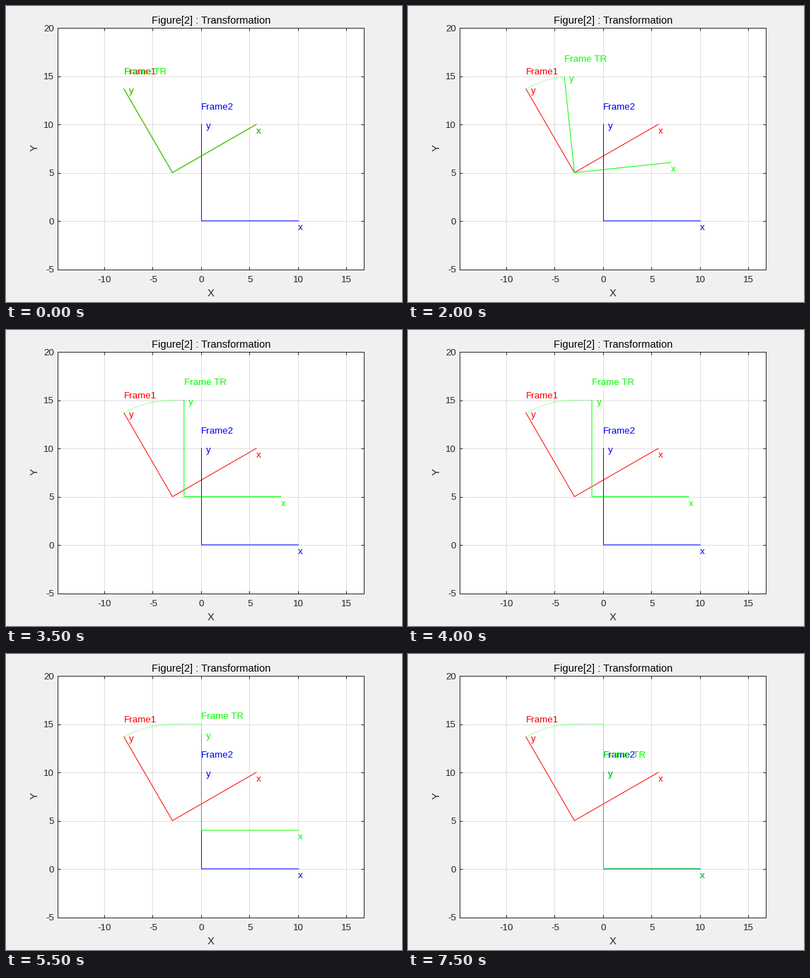
A matplotlib script for the animation above (8.5 s loop, 560 by 420 pixels).

```python
import numpy as np
import matplotlib.pyplot as plt
from matplotlib.animation import FuncAnimation
from matplotlib.transforms import ScaledTranslation

W, H, DPI = 560, 420, 100
PX = 72 / DPI                      # one pixel in points
plt.rcParams["font.family"] = "Liberation Sans"

UNIT = 13.692                      # pixels per data unit
LEFT, RIGHT, TOP, BOTTOM = 72.8, 506.4, 31.25, 373.55
X0 = 275.95                        # pixel column of x = 0
SMALL, LARGE = 40 / 3 * PX, 44 / 3 * PX
DARK = "#262626"
XTICKS = [-10, -5, 0, 5, 10, 15]
YTICKS = [-5, 0, 5, 10, 15, 20]

fig = plt.figure(figsize=(W / DPI, H / DPI), dpi=DPI, facecolor="#f0f0f0")
ax = fig.add_axes([LEFT / W, 1 - BOTTOM / H, (RIGHT - LEFT) / W, (BOTTOM - TOP) / H])
ax.set(xlim=((LEFT - X0) / UNIT, (RIGHT - X0) / UNIT), ylim=(-5, 20),
       xticks=XTICKS, yticks=YTICKS)
ax.set_axisbelow(True)
ax.grid(color="#dfdfdf", lw=PX)
ax.tick_params(direction="in", length=4.3 * PX, width=PX, color=DARK,
               top=True, right=True, labelbottom=False, labelleft=False)
for spine in ax.spines.values():
    spine.set(linewidth=PX, color=DARK)


def put(x, y, text, size=SMALL, color=DARK, ha="center", **kw):
    fig.text(x / W, 1 - y / H, text, size=size, color=color, ha=ha,
             **{"va": "baseline", **kw})


def shifted(dx, dy):
    """Data coordinates moved by a few pixels."""
    return ax.transData + ScaledTranslation(dx / DPI, dy / DPI, fig.dpi_scale_trans)


for v in XTICKS:
    put(X0 + 0.5 + v * UNIT, 392.5, str(v))
for v in YTICKS:
    put(68, BOTTOM - (v + 5) * UNIT + 4.7, str(v), ha="right")
put(290, 25, "Figure[2] : Transformation", LARGE, "black")
put(290, 412, "X", LARGE)
put(41, 201.5, "Y", LARGE, rotation=90, va="center")

line_tf = shifted(0.5, 0.2)
text_tf = shifted(0.3, -6.15)


class Axes2D:
    """A labelled pair of axes, ten units long."""

    def __init__(self, name, color, z):
        self.line, = ax.plot([], [], color=color, lw=PX, snap=False,
                             transform=line_tf, zorder=z)
        self.labels = [ax.text(0, 0, s, color=color, size=SMALL, va="baseline",
                               transform=text_tf, zorder=z + 5)
                       for s in ("x", "y", name)]

    def place(self, x, y, deg):
        a = np.radians(deg)
        c, s = 10 * np.cos(a), 10 * np.sin(a)
        xt, yt = (x + c, y + s), (x - s, y + c)
        self.line.set_data([xt[0], x, yt[0]], [xt[1], y, yt[1]])
        spots = (xt[0], xt[1] - 0.5), (yt[0] + 0.5, yt[1]), (yt[0], yt[1] + 2)
        for label, spot in zip(self.labels, spots):
            label.set_position(spot)


def pose(step):
    """Rotate, then slide right, then slide down, five steps each."""
    turn, right, down = (min(max(step - k, 0), 5) for k in (0, 5, 10))
    return -3 + 0.6 * right, 5 - down, 30 - 6 * turn


def tip(step):
    x, y, deg = pose(step)
    a = np.radians(deg)
    return x - 10 * np.sin(a), y + 10 * np.cos(a)


Axes2D("Frame1", "#ff0000", 3).place(-3, 5, 30)
Axes2D("Frame2", "#0000ff", 3).place(0, 0, 0)
moving = Axes2D("Frame TR", "#00ff00", 4)
trail, = ax.plot([], [], color="#00ff00", lw=PX, ls=(0, (1, 2)), snap=False,
                 transform=line_tf, zorder=2.5)


def update(i):
    step = min(i, 15)
    moving.place(*pose(step))
    trail.set_data(*zip(*(tip(k) for k in range(step + 1))))
    return [moving.line, trail, *moving.labels]


anim = FuncAnimation(fig, update, frames=17, interval=500, repeat=True,
                     repeat_delay=0, blit=False)
plt.show()
```
